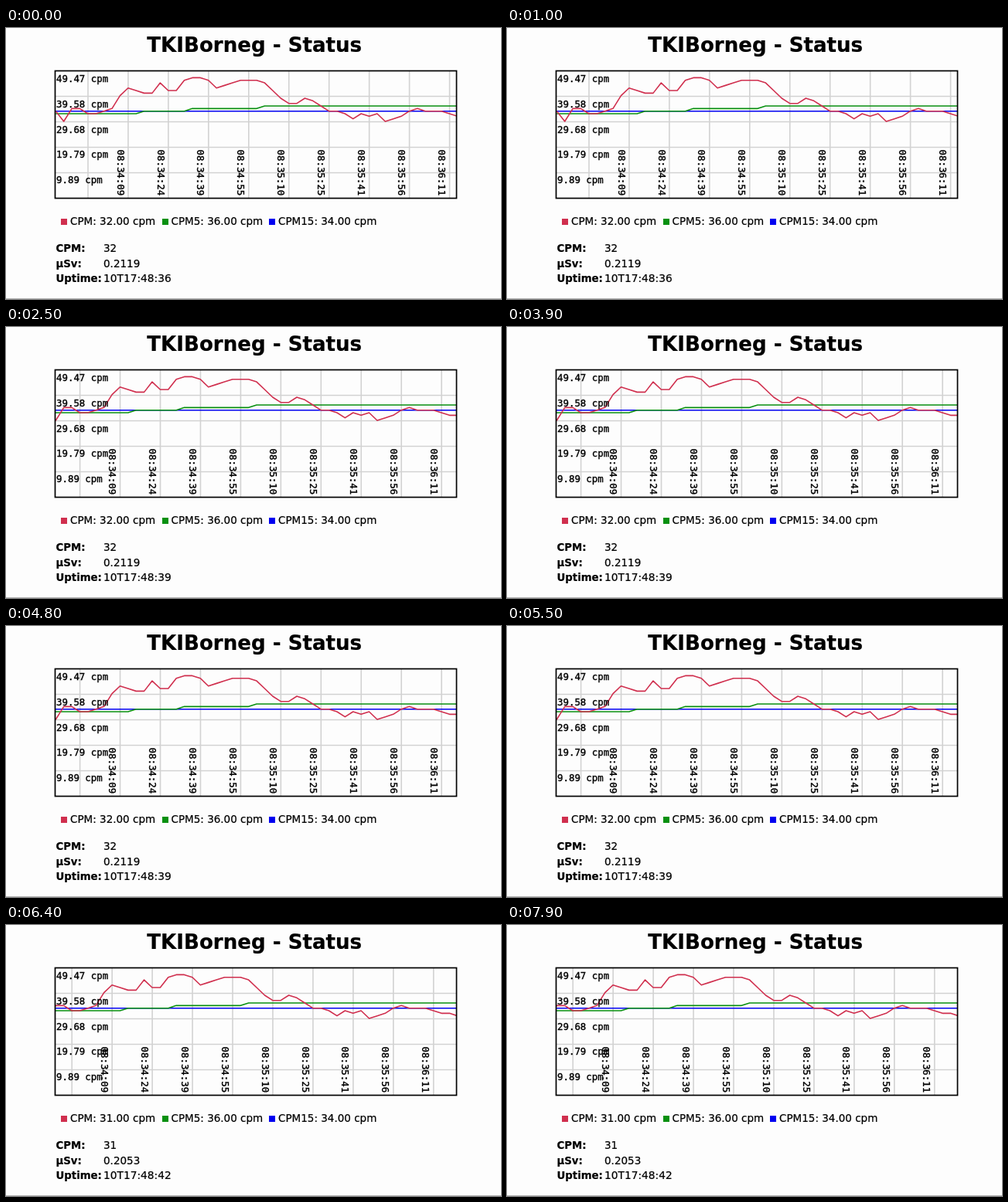
An HTML page that plays this animation: 640x351 px, repeating every 8000 ms.

```html
<!DOCTYPE html>
<html lang="en">
<head>
<meta charset="utf-8">
<title>Status</title>
<style>
  html, body { margin: 0; width: 100%; height: 100%; overflow: hidden; background: #fdfdfd; }
  svg { display: block; width: 640px; height: 351px; }
  text {
    font: 13.5px "DejaVu Sans", Verdana, sans-serif;
    fill: #000; stroke: #000; stroke-width: .2; white-space: pre;
  }
  .title { font-size: 26.1px; font-weight: bold; }
  .key { font-size: 13.3px; font-weight: bold; }
  .mono text { font: 12.4px "DejaVu Sans Mono", Menlo, monospace; stroke-width: .35; }
  .grid { stroke: #d2d2d2; stroke-width: 1.6; }
  .series { fill: none; stroke-width: 1.6; stroke-linejoin: round; }
  #uptime { font-size: 13.75px; }
</style>
</head>
<body>
<svg viewBox="0 0 640 351">
  <defs><clipPath id="plot"><rect x="64" y="56" width="518" height="164.5"/></clipPath></defs>
  <text class="title" x="182.3" y="31">TKIBorneg - Status</text>

  <g clip-path="url(#plot)">
    <g id="rows" class="grid"></g>
    <g id="cols" class="grid"></g>
    <g id="lines" class="series"></g>
    <g id="scale" class="mono"></g>
    <g id="times" class="mono"></g>
  </g>
  <rect x="63.5" y="55.5" width="519" height="165" fill="none" stroke="#000" stroke-width="1.7"/>

  <rect x="71" y="247" width="8" height="8" fill="#d02f4e"/>
  <text id="legend" x="83" y="255"></text>
  <rect x="202" y="247" width="8" height="8" fill="#089010"/>
  <text x="213.5" y="255">CPM5: 36.00 cpm</text>
  <rect x="340" y="247" width="8" height="8" fill="#0000f0"/>
  <text x="352" y="255">CPM15: 34.00 cpm</text>

  <text class="key" x="64.5" y="290">CPM:</text>
  <text id="cpm" x="126" y="290"></text>
  <text class="key" x="64.5" y="309.5">µSv:</text>
  <text id="dose" x="126" y="309.5"></text>
  <text class="key" x="64.5" y="329">Uptime:</text>
  <text id="uptime" x="126" y="329"></text>

  <rect y="350" width="640" height="1" fill="#b4b4b4"/>
</svg>
<script>
  const LOOP = 8000, STEP = 10.39, LEFT = 64.3;
  const $ = id => document.getElementById(id);

  function add(parent, tag, attrs, text) {
    const el = document.createElementNS('http://www.w3.org/2000/svg', tag);
    for (const k in attrs) el.setAttribute(k, attrs[k]);
    if (text) el.textContent = text;
    $(parent).appendChild(el);
  }

  const cpm = [34, 30, 35, 35, 33, 33, 34, 35, 40, 43, 42, 41, 41, 45, 42, 42, 46, 47,
    47, 46, 43, 44, 45, 46, 46, 46, 45, 42, 39, 37, 37, 39, 38, 36, 34, 34, 33, 31,
    33, 32, 33, 30, 31, 32, 34, 35, 34, 34, 34, 33, 32, 32, 31];
  const cpm5 = cpm.map((_, i) => i < 11 ? 33 : i < 17 ? 34 : i < 26 ? 35 : 36);
  const cpm15 = cpm.map(() => 34);

  function plot(values, stroke) {
    const points = values.map((v, i) =>
      (LEFT + i * STEP).toFixed(2) + ',' + (220.9 - v * 3.33).toFixed(2)).join(' ');
    add('lines', 'polyline', { points, stroke });
  }
  plot(cpm15, '#0000f0');
  plot(cpm5, '#089010');
  plot(cpm, '#d02f4e');

  ['49.47', '39.58', '29.68', '19.79', '9.89'].forEach((v, i) => {
    const y = 55.5 + i * 33;
    if (i) add('rows', 'line', { x1: 64, x2: 582, y1: y, y2: y });
    add('scale', 'text', { x: 65, y: 70 + i * 32.8 }, v + ' cpm');
  });

  const two = n => String(n).padStart(2, '0');
  for (let k = 0; k < 10; k++) {
    const x = 106 + k * 51.95;
    add('cols', 'line', { x1: x, x2: x, y1: 55, y2: 221 });
    if (!k) continue;
    const s = Math.floor(9 + (k - 1) * 15.35);
    add('times', 'text', { transform: `translate(${x - 14.4} 157.5) rotate(90)` },
      `08:${34 + Math.floor(s / 60)}:${two(s % 60)}`);
  }

  const states = [
    { at: 0, cpm: 32, dose: '0.2119', sec: 36 },
    { at: 2300, cpm: 32, dose: '0.2119', sec: 39 },
    { at: 5600, cpm: 31, dose: '0.2053', sec: 42 }
  ];
  let shown = -1;

  function show(n) {
    const s = states[n];
    for (const id of ['cols', 'lines', 'times'])
      $(id).setAttribute('transform', `translate(${-n * STEP} 0)`);
    $('legend').textContent = `CPM: ${s.cpm}.00 cpm`;
    $('cpm').textContent = s.cpm;
    $('dose').textContent = s.dose;
    $('uptime').textContent = `10T17:48:${s.sec}`;
    shown = n;
  }

  function tick() {
    const t = performance.now() % LOOP;
    const n = states.filter(s => s.at <= t).length - 1;
    if (n !== shown) show(n);
    requestAnimationFrame(tick);
  }
  tick();
</script>
</body>
</html>
```
